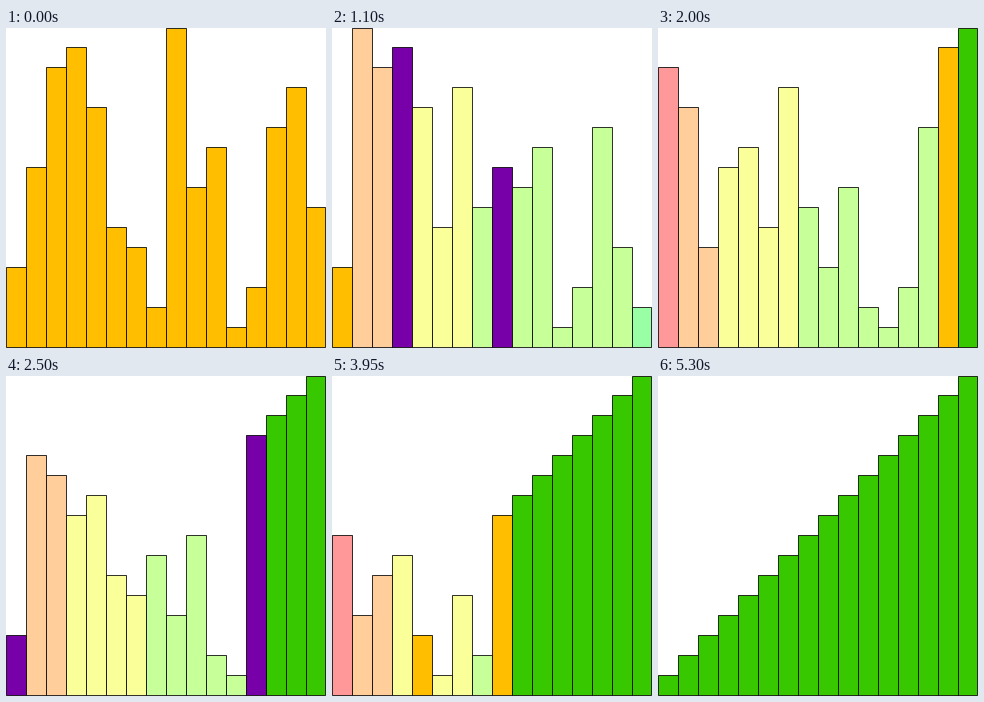
Write a matplotlib script that moves like this. It is 320 px wide and 320 px high and loops after 5650 ms.

```python
import matplotlib.pyplot as plt
from matplotlib.animation import FuncAnimation
from matplotlib.patches import Rectangle

SIZE, DPI, CELL = 320, 100, 20
STEP_MS, TOTAL = 50, 113
LINE = 0.8 * 72 / DPI

AMBER, PURPLE, GREEN = "#ffbf00", "#7800a8", "#38c800"
LEVELS = ["#ff9999", "#ffce9b", "#fbff9a", "#c7ff99", "#99ffa4"]

START = [4, 9, 14, 15, 12, 6, 5, 2, 16, 8, 10, 1, 3, 11, 13, 7]


def depth(i):
    return (i + 1).bit_length() - 1


class HeapSort:
    """Runs a heap sort and keeps a picture of every step."""

    def __init__(self, values):
        self.values = list(values)
        self.colors = [AMBER] * len(values)
        self.steps = []

    def show(self, marked=(), color=AMBER):
        colors = self.colors.copy()
        for i in marked:
            colors[i] = color
        self.steps.append((self.values.copy(), colors))

    def paint(self, *places):
        for i in places:
            self.colors[i] = LEVELS[depth(i)]

    def swap(self, i, j):
        v = self.values
        v[i], v[j] = v[j], v[i]
        self.show((i, j), PURPLE)

    def sift(self, i, n):
        v = self.values
        while 2 * i + 1 < n:
            left, right = 2 * i + 1, 2 * i + 2
            child = right if right < n and v[right] > v[left] else left
            if v[child] <= v[i]:
                self.paint(i)
                self.show((left,) if right >= n else ())
                return
            # the smaller right child lights up before a left swap
            if depth(i) == 1 and child == left and n > 7:
                self.show((right,))
            self.swap(i, child)
            self.paint(i, child)
            self.show()
            i = child

    def run(self):
        size = len(self.values)
        self.show()
        self.show()
        for i in reversed(range(size)):
            if 2 * i + 1 < size:
                self.sift(i, size)
            else:
                self.paint(i)
                self.show()
        for n in range(size - 1, 0, -1):
            self.colors[n] = AMBER
            self.colors[n + 1:] = [GREEN] * (size - n - 1)
            self.swap(0, n)
            self.sift(0, n)
        self.colors = [GREEN] * size
        self.show()
        return self.steps


steps = HeapSort(START).run()

fig = plt.figure(figsize=(SIZE / DPI, SIZE / DPI), dpi=DPI, facecolor="white")
ax = fig.add_axes([0, 0, 1, 1])
ax.set_xlim(0, SIZE)
ax.set_ylim(SIZE, 0)
ax.axis("off")

# edges run through pixel centres, so snapping would shift them
base = SIZE - 0.5
bars = []
for k in range(len(START)):
    x = k * CELL + 0.5
    bar = Rectangle((x, base), min(CELL, base - x), 0, edgecolor="black",
                    linewidth=LINE, joinstyle="miter", snap=False)
    bars.append(ax.add_patch(bar))


def update(frame):
    values, colors = steps[min(frame, len(steps) - 1)]
    for bar, value, color in zip(bars, values, colors):
        top = max(0.5, base - CELL * value)
        bar.set_y(top)
        bar.set_height(base - top)
        bar.set_facecolor(color)
    return bars


anim = FuncAnimation(fig, update, frames=TOTAL, interval=STEP_MS,
                     init_func=lambda: update(0), repeat=True)
plt.show()
```
